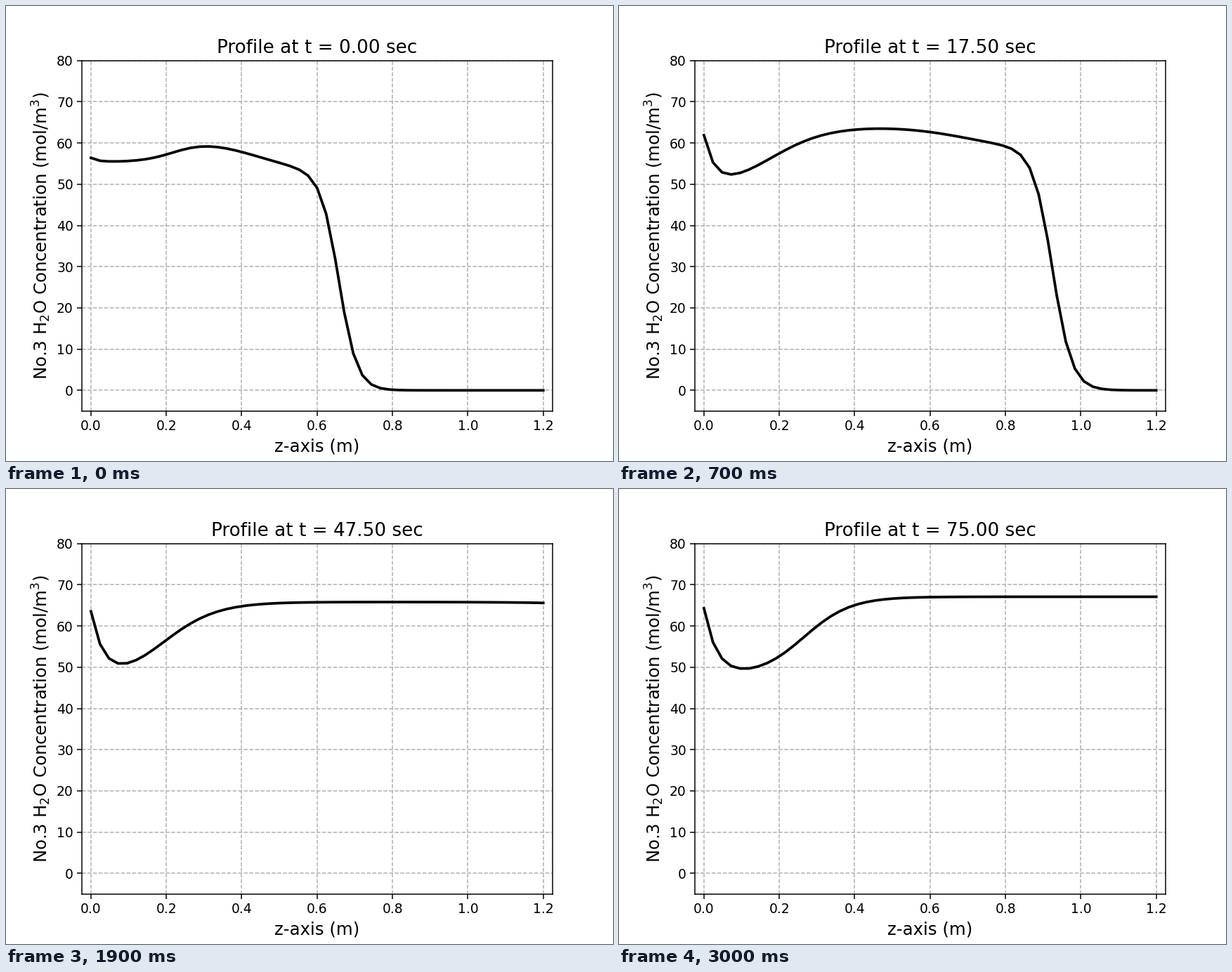
A matplotlib script for the animation above (3.1 s loop, 864 px wide and 648 px high).

```python
import numpy as np
import matplotlib.pyplot as plt
from matplotlib.animation import FuncAnimation

FRAMES = 31
STEP = 2.5            # simulated seconds per frame
BED = 1.2             # length of the z-axis
z = np.linspace(0, BED, 51)


def sigmoid(x):
    return 1 / (1 + np.exp(-x))


def inlet_level(t):
    """Concentration at z = 0: a jump after the start, then a slow ramp."""
    return 56.5 if t == 0 else np.interp(t, [30, 55], [61.9, 64.3])


def profile(t):
    early = np.exp(-(t / 17) ** 3)

    # Rise from the trough near the inlet up to the plateau.
    low = 42 + 0.073 * t + 13.5 * early
    high = np.interp(t, [0, 15, 28, 58, 75], [62.2, 64.3, 64.4, 66.6, 67.1])
    centre = 0.135 + 0.13 * (t / 75) ** 2 + 0.09 * early
    slope = 10 + 0.08 * t + 12 * early ** 2
    level = low + (high - low) * sigmoid(slope * (z - centre))

    # Decay from the inlet into the trough.
    width = 0.034 * (1 - 0.5 * early)
    level += (inlet_level(t) - level[0]) * np.exp(-z / width)

    # The plateau sags behind the front, and the front cuts it off.
    front = 0.658 + 0.01525 * t
    sag = 10 * np.exp(-(t / 25) ** 2)
    level -= sag * sigmoid((z - front + 0.23) / 0.09)
    return level * sigmoid((37.7 + 4 * early) * (front - z))


fig, ax = plt.subplots(figsize=(6.4, 4.8), dpi=135)
line, = ax.plot(z, profile(0), color="black", linewidth=2)
title = ax.set_title("", fontsize=14)
ax.set_xlabel("z-axis (m)", fontsize=13)
ax.set_ylabel("No.3 H$_2$O Concentration (mol/m$^3$)", fontsize=13, labelpad=3)
ax.tick_params(pad=3)
ax.set_xlim(-0.02 * BED, 1.02 * BED)
ax.set_ylim(-5, 80)
ax.grid(linestyle="--")


def update(frame):
    t = frame * STEP
    line.set_ydata(profile(t))
    title.set_text(f"Profile at t = {t:.2f} sec")
    return line, title


anim = FuncAnimation(fig, update, frames=FRAMES, interval=100,
                     repeat=True, repeat_delay=0, blit=False)
plt.show()
```
